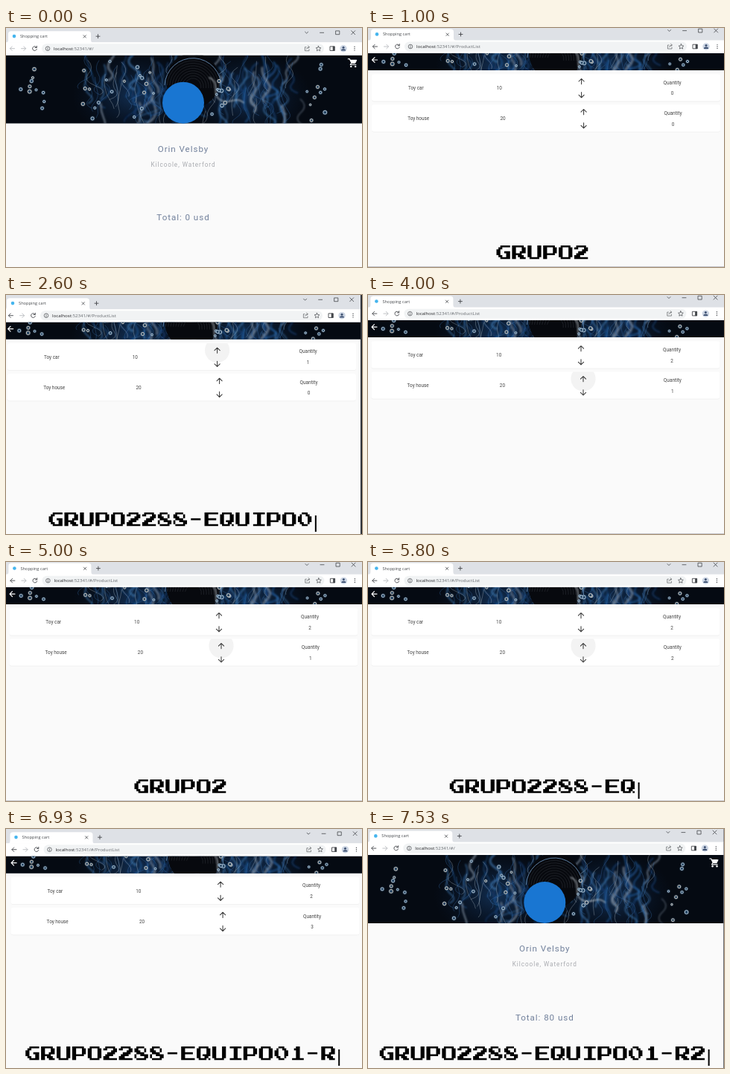
These frames come from a looping animation (478 px wide and 322 px high, 7.99 s). An HTML page:

```html
<!DOCTYPE html>
<html lang="en">
<head>
<meta charset="utf-8">
<title>Shopping cart</title>
<style>
  html, body { margin: 0; width: 100%; height: 100%; overflow: hidden; background: #30333a; }
  svg { display: block; width: 100vw; height: 100vh; }
  text { font-family: Roboto, sans-serif; white-space: pre; }
  .ui { font-family: "Open Sans", sans-serif; }
  .line { fill: none; stroke-linecap: round; stroke-linejoin: round; }
</style>
</head>
<body>
<svg id="stage" viewBox="0 0 478 322"></svg>
<script>
const LOOP = 7990, SECOND = 3995, STEP = 1000 / 15;
const BANNER_Y = 34, HOME_H = 92, LIST_H = 23;
const LEFT = -6, WIDE = 485;

// ---------- drawing helpers ----------
const rect = (x, y, w, h, fill, extra = '') =>
  `<rect x="${x}" y="${y}" width="${w}" height="${h}" fill="${fill}" ${extra}/>`;
const dot = (x, y, r, fill, extra = '') =>
  `<circle cx="${x}" cy="${y}" r="${r}" fill="${fill}" ${extra}/>`;
const line = (d, color, width = 0.9, extra = '') =>
  `<path class="line" d="${d}" stroke="${color}" stroke-width="${width}" ${extra}/>`;
const label = (x, y, s, size, fill, extra = 'text-anchor="middle"') =>
  `<text x="${x}" y="${y + size * 0.35}" font-size="${size}" fill="${fill}" ${extra}>${s}</text>`;

function randomFrom(seed) {
  return () => (seed = (seed * 16807) % 2147483647) / 2147483647;
}

// ---------- banner picture ----------
function bannerArt() {
  const rnd = randomFrom(4211);
  const near = (c, n) => +(c + (rnd() + rnd() - 1) * n).toFixed(1);
  const strand = (x, y) => {
    const bend = near(0, 16);
    return `M${x} ${y}q${bend} 9 ${near(0, 8)} 18t${near(0, 12)} 16t${near(0, 12)} 12`;
  };
  let s = rect(LEFT, 0, WIDE, HOME_H, '#050a12');
  let soft = '', fine = '';
  for (const x of [175, 325]) {
    s += `<ellipse cx="${x}" cy="54" rx="85" ry="60" fill="url(#glow)"/>`;
    for (let i = 0; i < 32; i++) {
      const tone = ['#123a6d', '#1f5795', '#3f78b0', '#8b9aaa'][i % 4];
      soft += line(strand(near(x, 85), near(24, 50)), tone, 1 + rnd() * 2.4, 'opacity=".6"');
      fine += line(strand(near(x, 85), near(26, 55)), i % 3 ? '#3d79b8' : '#b9c4cd', 0.6, 'opacity=".55"');
    }
  }
  s += `<g filter="url(#soft)">${soft}</g>${fine}`;

  // the dark head and its strands of hair
  s += '<ellipse cx="252" cy="34" rx="36" ry="37" fill="#07090e"/>';
  for (let i = 0; i < 9; i++) {
    const r = 38 - i * 3.4;
    s += line(`M${252 - r} 40A${r} ${r} 0 0 1 ${252 + r} 44`, i ? '#2c2f36' : '#5d7fa3', i ? 0.6 : 1);
  }
  s += line('M274 30c16 8 2 22 14 30s22-6 32 4', '#cbd3da', 1.6, 'opacity=".7" filter="url(#soft)"');

  // glowing rings hang in loose columns
  for (const x of [42, 122, 178, 295, 418])
    for (let i = 0; i < 10; i++) {
      const cx = near(x, 24), cy = near(50, 48), r = 1.2 + rnd() * 1.2;
      s += dot(cx, cy, r + 1.2, '#5c8fc0', 'opacity=".25"') +
        dot(cx, cy, r.toFixed(1), '#20405f', `stroke="${i % 3 ? '#c5d6e4' : '#e6dccd'}" stroke-width=".9"`);
    }
  return s;
}

// ---------- browser frame ----------
function browser() {
  const ink = '#44474b';
  return rect(LEFT, -6, WIDE, 23, '#dee1e6') +
    '<path d="M1 17Q4 17 4 13V5Q4 1.5 8 1.5H111Q115 1.5 115 5V13Q115 17 118 17Z" fill="#fff"/>' +
    rect(LEFT, 16.5, WIDE, 17.5, '#fff') +
    dot(12, 8.4, 2.3, '#45b5ee') +
    label(20, 8.5, 'Shopping cart', 5.7, '#45484c', 'class="ui"') +
    line('M105 7l3.4 3.4M108.4 7l-3.4 3.4', ink, 0.8) +
    line('M122 8.5h5M124.5 6v5', ink, 0.9) +
    line('M402.6 2.5l2 2 2-2M422.6 3.6h5M444 1.2h4.8v4.8h-4.8zM464.7 1l5 5M469.7 1l-5 5', ink, 0.8) +
    line('M12.5 25h-6M9.2 22.2L6.4 25l2.8 2.8', ink, 0.9, 'id="back"') +
    line('M21.5 25h6M24.8 22.2l2.8 2.8-2.8 2.8', '#b9bcc0') +
    line('M42 23.4a2.9 2.9 0 1 0 .3 2.4M42.3 21.6v2.2h-2.2', ink) +
    rect(49, 18.6, 379, 12.8, '#f1f3f4', 'rx="6.4"') +
    dot(57, 25, 2.8, 'none', `stroke="${ink}" stroke-width=".7"`) +
    line('M57 24.8v1.7M57 23.4v.1', ink, 0.7) +
    label(65, 25, 'localhost<tspan fill="#666a6f">:52341/#/<tspan id="route"></tspan></tspan>', 6.16, '#202124', 'class="ui"') +
    line('M404 23h-1.6v5h5.6v-2M404.5 25.6q.5-2.6 3.4-2.6M406.6 21.5l1.8 1.5-1.8 1.6', ink, 0.6) +
    line('M420.5 21.6l1 2.2 2.4.3-1.8 1.6.5 2.4-2.1-1.2-2.1 1.2.5-2.4-1.8-1.6 2.4-.3z', ink, 0.7) +
    line('M436.4 22.2h5.8v5.6h-5.8z', ink, 0.9) + rect(439.7, 22, 2.7, 6, ink) +
    dot(454, 25, 4.7, '#cdd6e4') + dot(454, 23.5, 1.5, '#3f5272') +
    '<path d="M451 27.9q0-2.3 3-2.3t3 2.3z" fill="#3f5272"/>' +
    [-1, 0, 1].map(i => dot(469, 25 + i * 2.4, 0.7, ink)).join('');
}

// ---------- pages ----------
function homePage() {
  const big = 'text-anchor="middle" letter-spacing=".95"';
  return `<g clip-path="url(#homeClip)"><use href="#art" y="${BANNER_Y}"/></g>` +
    dot(239, 98, 28, '#1976d2') +
    line('M460.4 39h2l2.6 5.6h4.6l2-3.8', '#fff', 1.2) +
    '<path d="M462.6 40h9l-2.2 4.6h-4.6z" fill="#fff"/>' +
    line('M464.5 44.8l-1.2 2h7.6', '#fff', 1.2) +
    dot(464.3, 49.2, 1.2, '#fff') + dot(470.2, 49.2, 1.2, '#fff') +
    label(239, 159.9, 'Orin Velsby', 11.6, '#71809b', big) +
    label(239, 181.2, 'Kilcoole, Waterford', 8.2, '#a9abb0', big) +
    label(239, 252.6, 'Total: <tspan id="total">0</tspan> usd', 11.6, '#71809b', big);
}

const arrow = (x, y, dir) =>
  line(`M${x} ${y + 3.6 * dir}v${-7.2 * dir}M${x - 3.6} ${y}l3.6 ${-3.6 * dir} 3.6 ${3.6 * dir}`, '#3a3a3a', 1.05);

function productRow(id, top, name, nameX, price, priceX, arrowX, qtyX) {
  const mid = top + 18.7;
  return rect(5, top + 0.8, 468, 36.4, '#000', 'rx="3" opacity=".05"') +
    rect(5, top, 468, 36.4, '#fff', 'rx="3"') +
    `<clipPath id="${id}Clip">${rect(5, top, 468, 36.4, '#fff')}</clipPath>` +
    `<g id="${id}Hover" clip-path="url(#${id}Clip)">${dot(arrowX, top + 9.5, 16.6, '#f3f3f3')}</g>` +
    label(nameX, mid, name, 6.4, '#444') +
    label(priceX, mid, price, 6.4, '#444') +
    arrow(arrowX, top + 9.8, 1) + arrow(arrowX, top + 28, -1) +
    label(qtyX, top + 11.3, 'Quantity', 6.5, '#444') +
    label(qtyX, top + 26, `<tspan id="${id}Qty">0</tspan>`, 6.4, '#444');
}

function listPage() {
  return `<g clip-path="url(#listClip)"><use href="#art" y="${BANNER_Y - (HOME_H - LIST_H) / 2}"/></g>` +
    line('M12.6 43h-7M9 39.6L5.6 43 9 46.4', '#fff', 1.2) +
    productRow('car', 62.2, 'Toy car', 64.3, '10', 176.3, 286.6, 408.6) +
    productRow('house', 103.3, 'Toy house', 67.7, '20', 181, 289.6, 409.5);
}

// ---------- block lettering: unit pen strokes, drawn twice as wide as tall ----------
const TOP = 'M.5 .5H3', BASE = 'M.5 6.5H3', STEM = 'M.5 0v7', SIDES = 'M.5 1v5M3 1v5';
const GLYPHS = {
  O: TOP + SIDES + BASE,
  U: 'M.5 0v6M3 0v6' + BASE,
  P: STEM + 'M1 .5h2M3 1v3M1 4.5h2',
  R: STEM + 'M1 .5h2M3 1v2M2 3.5h1.5M1 4.5h1.5M1.5 5.5H3M2 6.5h1.5',
  E: STEM + 'M1 .5h2.5M1 3.5h2M1 6.5h2.5',
  G: 'M1 .5h2.5M.5 1.5h1M.5 2v3M2 3.5h1.5M3 4v3M.5 5.5h1M1 6.5h2.5',
  Q: TOP + 'M.5 1v5M3 1v3M1.5 4.5h2M2 5.5h1M.5 6.5h2M3 6.5h.5',
  I: 'M.5 .5h3M2 1v5M.5 6.5h3',
  0: 'M1 .5h1.5M.5 1.5h.5M2 1.5h1M.5 2v3M3 2v3M.5 5.5h1M2.5 5.5h.5M1 6.5h1.5',
  1: 'M2 0v6M1 1.5h.5M.5 6.5h3',
  2: TOP + 'M.5 1v1M3 1v1M2 2.5h1.5M1 3.5h2M.5 4.5h2M0 5.5h1.5M0 6.5h3.5',
  8: 'M.5 .5h2M.5 1v2M2.5 1.5h.5M2.5 2.5h.5M1 2.5h.5M.5 3.5h2M0 4.5h.5M1.5 4.5h2M0 5.5h.5M3 5v1' + BASE,
  '-': 'M.5 3.5H3'
};
const CAPTION = 'GRUPO2288-EQUIPO01-R2', PITCH = 20.9, UNIT = PITCH / 8;
const CENTER = 235.2, CAPTION_Y = 293;

const letters = [...CAPTION].map((ch, i) =>
  `<path d="${GLYPHS[ch]}" transform="translate(${i * 4})"/>`).join('');

// ---------- scene ----------
const stage = document.getElementById('stage');
stage.innerHTML = `<defs>
    <radialGradient id="glow"><stop offset="0" stop-color="#1d4a80" stop-opacity=".6"/>
      <stop offset="1" stop-color="#0b2244" stop-opacity="0"/></radialGradient>
    <filter id="soft"><feGaussianBlur stdDeviation="1"/></filter>
    <clipPath id="homeClip">${rect(LEFT, BANNER_Y, WIDE, HOME_H, '#fff')}</clipPath>
    <clipPath id="listClip">${rect(LEFT, BANNER_Y, WIDE, LIST_H, '#fff')}</clipPath>
    <g id="art">${bannerArt()}</g>
  </defs>
  <g id="camera">${rect(LEFT, -6, WIDE, 334, '#fafafa')}${rect(LEFT, 321, WIDE, 7, '#c4c5ca')}${browser()}
    <g id="home">${homePage()}</g><g id="list">${listPage()}</g></g>
  <g id="caption" role="img" aria-label="${CAPTION}" fill="none" stroke="#000">${letters}</g>
  <rect id="cursor" y="297" width="2" height="22" fill="#000"/>`;

const el = {};
stage.querySelectorAll('[id]').forEach(n => el[n.id] = n);
const show = (node, on) => node.setAttribute('visibility', on ? 'visible' : 'hidden');

// ---------- timing ----------
const LIST_SHOWN = [930, 7070], CAPTION_GAP = [3870, SECOND];
const CLICKS = { car: [2330, 2870], house: [3930, 5400, 6130] };
const HOVER = { car: [2130, 3900], house: [3900, 6670] };
const REST = [-1, 2.7];
// camera drifts: from, to, x, y
const DRIFTS = [[870, 1000, 0, 0], [1800, 2530, -3, 2.7], [2600, 3130, -0.6, 0.1],
  [6670, 6930, 1.5, 2.7], [6930, 7130, -1.7, 1]];

const within = (t, [a, b]) => t >= a && t < b;
const clamp = p => Math.max(0, Math.min(1, p));

function cameraAt(t) {
  return DRIFTS.reduce(([x, y], [from, to, nx, ny]) => {
    const p = clamp((t - from) / (to - from));
    return [x + (nx - x) * p, y + (ny - y) * p];
  }, REST);
}

// five letters every eleven steps
function typedAt(t) {
  if (within(t, CAPTION_GAP)) return 0;
  const step = Math.floor((t % SECOND) / STEP + 0.05);
  return Math.min(CAPTION.length, Math.floor((step + 0.3) / 2.2));
}

const cursorOn = t => ((t % SECOND) + 430) % 990 < 430;

function render(t) {
  el.camera.setAttribute('transform', `translate(${cameraAt(t)})`);

  const onList = within(t, LIST_SHOWN);
  show(el.home, !onList);
  show(el.list, onList);
  el.route.textContent = onList ? 'ProductList' : '';
  el.back.setAttribute('stroke', t < LIST_SHOWN[0] ? '#b9bcc0' : '#44474b');

  const qty = {};
  for (const id of ['car', 'house']) {
    qty[id] = CLICKS[id].filter(k => t >= k).length;
    el[id + 'Qty'].textContent = qty[id];
    show(el[id + 'Hover'], onList && within(t, HOVER[id]));
  }
  el.total.textContent = qty.car * 10 + qty.house * 20;

  const n = typedAt(t), half = n * PITCH / 2;
  [...el.caption.children].forEach((glyph, i) => show(glyph, i < n));
  el.caption.setAttribute('transform', `translate(${CENTER - half} ${CAPTION_Y}) scale(${UNIT * 2} ${UNIT})`);
  el.cursor.setAttribute('x', CENTER + half + 2);
  show(el.cursor, n > 0 && cursorOn(t));
}

const start = performance.now();
function tick() {
  render((performance.now() - start) % LOOP);
  requestAnimationFrame(tick);
}
tick();
</script>
</body>
</html>
```
